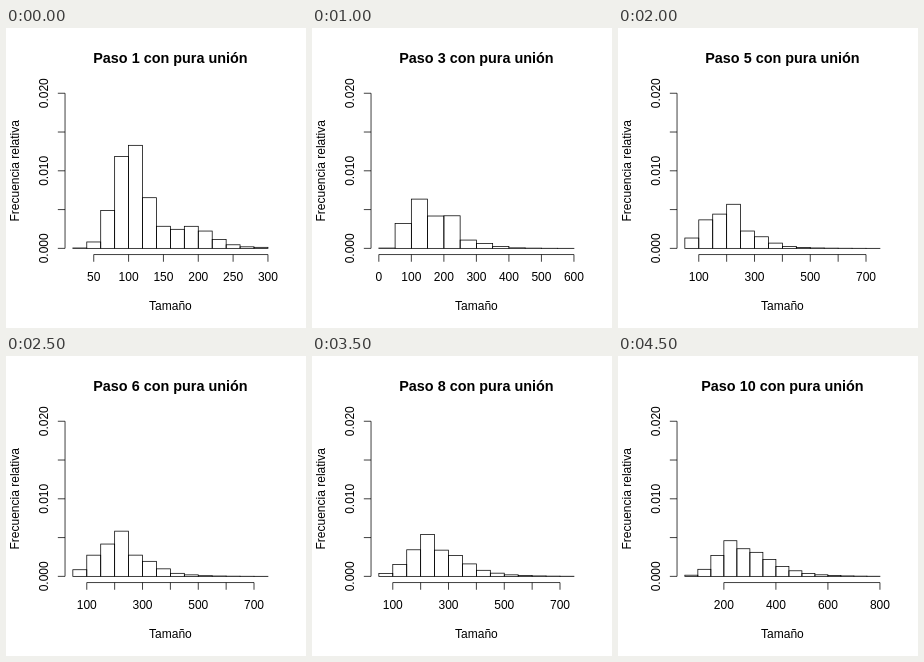
These frames come from a looping animation (300 by 300 pixels, 5000 ms). An HTML page with a canvas:

```html
<!DOCTYPE html>
<html lang="es">
<head>
<meta charset="utf-8">
<style>
  html, body { margin: 0; width: 100%; height: 100%; overflow: hidden; background: #fff; }
  canvas { display: block; }
</style>
</head>
<body>
<canvas id="stage" width="300" height="300"></canvas>
<script>
const ctx = document.getElementById('stage').getContext('2d');
const STEP_MS = 500, STEPS = 10;
const FONT = '"Liberation Sans", Arial, Helvetica, sans-serif';

// Plot region in pixels: data area plus the two axis lines
const LEFT = 66.84, WIDTH = 195.11, BASE = 220.36, HEIGHT = 155.11;
const AXIS_X = 59.04, AXIS_Y = 226.56, TICK = 7.2, CENTER = 164.4;
const MAX_DENSITY = 0.02;

// Size range covered at each step
const ranges = [[20, 300], [0, 450], [0, 600], [50, 600], ...Array(5).fill([50, 750]), [50, 800]];

// Key points of the size distribution: [size, log-odds of being smaller at the first step, at the last]
const keys = [
  [20, -9.8, -12], [60, -4.03, -8], [80, -2.04, -6.3], [100, -0.61, -4.86], [120, 0.48, -4],
  [140, 1.09, -3.2], [160, 1.42, -2.56], [180, 1.77, -2], [200, 2.33, -1.46], [250, 4.2, -0.33],
  [300, 5.2, 0.39], [400, 8.1, 1.82], [500, 10, 3.18], [800, 14, 7],
];

const mix = (a, b, t) => a + (b - a) * t;

// Share of clusters below a size; the odds fall as clusters merge, small sizes at a steadier rate
function shareBelow(size, step) {
  size = Math.max(size, keys[0][0]);
  const next = Math.max(1, keys.findIndex(key => key[0] >= size));
  const [size1, first1, last1] = keys[next - 1], [size2, first2, last2] = keys[next];
  const t = (size - size1) / (size2 - size1);
  const delay = (200 / size) ** 5;
  const progress = Math.log((step + delay) / (1 + delay)) / Math.log((STEPS + delay) / (1 + delay));
  const logOdds = mix(mix(first1, first2, t), mix(last1, last2, t), progress);
  return 1 / (1 + Math.exp(-logOdds));
}

function line(x1, y1, x2, y2) {
  ctx.beginPath();
  ctx.moveTo(x1, y1);
  ctx.lineTo(x2, y2);
  ctx.stroke();
}

function label(text, x, y, { angle = 0, font = '12px ' } = {}) {
  ctx.save();
  ctx.translate(x, y);
  ctx.rotate(angle);
  ctx.font = font + FONT;
  ctx.textAlign = 'center';
  ctx.fillText(text, 0, 0);
  ctx.restore();
}

function drawYAxis() {
  const upright = { angle: -Math.PI / 2 };
  line(AXIS_X, BASE, AXIS_X, BASE - HEIGHT);
  for (let i = 0; i <= 4; i++) {
    const y = BASE - HEIGHT * i / 4;
    line(AXIS_X, y, AXIS_X - TICK, y);
    if (i % 2 === 0) label((MAX_DENSITY * i / 4).toFixed(3), 41.76, y, upright);
  }
  label('Frecuencia relativa', 12.96, 142.8, upright);
}

function drawXAxis(min, max, toX) {
  // About five ticks, 50, 100 or 200 apart; crowded labels alternate
  const gap = 50 * 2 ** Math.round(Math.log2((max - min) / 250));
  const first = Math.ceil(min / gap) * gap, last = Math.floor(max / gap) * gap;
  const labelGap = toX(gap) - toX(0) < 30 ? 2 * gap : gap;
  line(toX(first), AXIS_Y, toX(last), AXIS_Y);
  for (let value = first; value <= last; value += gap) {
    line(toX(value), AXIS_Y, toX(value), AXIS_Y + TICK);
    if ((value - first) % labelGap === 0) label(value, toX(value), 253);
  }
  label('Tamaño', CENTER, 282);
}

function drawBars(min, max, step, toX) {
  const bin = step === 1 ? 20 : 50;
  for (let size = min; size < max; size += bin) {
    const density = (shareBelow(size + bin, step) - shareBelow(size, step)) / bin;
    const height = HEIGHT * density / MAX_DENSITY;
    ctx.strokeRect(toX(size), BASE - height, toX(size + bin) - toX(size), height);
  }
}

function draw(step) {
  const [min, max] = ranges[step - 1];
  const toX = value => LEFT + WIDTH * (value - min) / (max - min);
  ctx.fillStyle = '#fff';
  ctx.fillRect(0, 0, 300, 300);
  ctx.fillStyle = ctx.strokeStyle = '#000';
  ctx.lineWidth = 0.75;
  label(`Paso ${step} con pura unión`, CENTER, 35, { font: 'bold 14.4px ' });
  drawYAxis();
  drawXAxis(min, max, toX);
  drawBars(min, max, step, toX);
}

function frame() {
  draw(Math.floor(performance.now() / STEP_MS) % STEPS + 1);
  requestAnimationFrame(frame);
}
frame();
</script>
</body>
</html>
```
